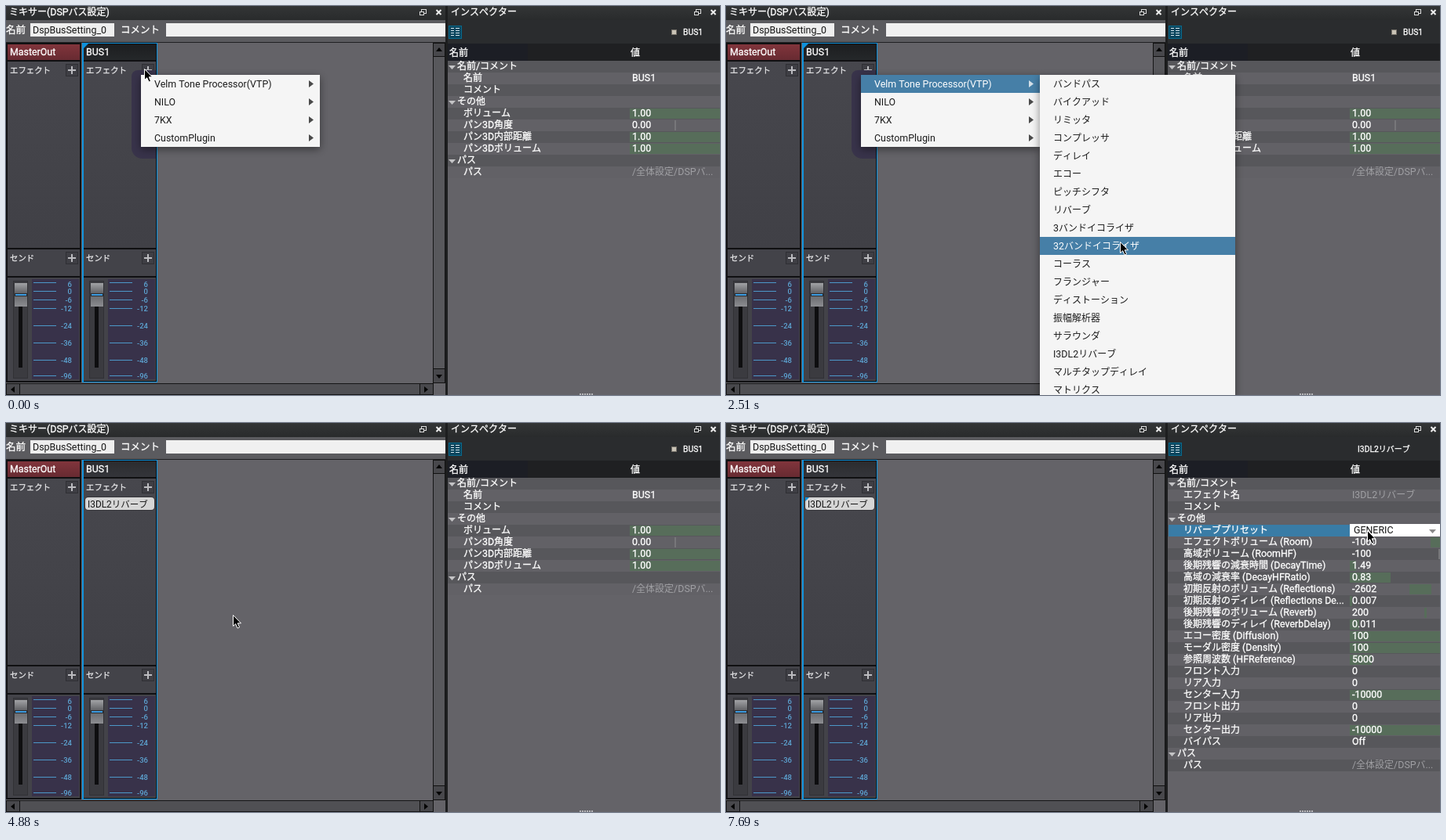
An HTML page with a canvas for the animation above (8000 ms loop, 910 by 497 pixels).

```html
<!DOCTYPE html>
<html lang="ja">
<head>
<meta charset="utf-8">
<title>ミキサー</title>
<style>
html, body { margin: 0; width: 100%; height: 100%; overflow: hidden; background: #646368; }
canvas { display: block; }
</style>
</head>
<body>
<canvas id="stage" width="910" height="497"></canvas>
<script>
const ctx = document.getElementById('stage').getContext('2d');
const LOOP = 8000, STEP = 148;
const BLUE = '#0f92dc', HOVER = '#467fa7';

const linear = u => u;
const brake = u => 1 - (1 - u) ** 3.9;
const swing = u => { const v = u ** .85; return v * v * (3 - 2 * v); };

// Pointer strokes: start time, steps, easing, end point, optional control point of the curve.
const START = [176, 80];
const MOVES = [
  [600, 3, brake, [234, 101]],
  [1480, 4, swing, [494, 193], [380, 40]],
  [2220, 3, linear, [502, 301]],
  [2660, 2, linear, [497, 370]],
  [3110, 3, linear, [486, 436]],
  [4880, 5, brake, [147, 101], [317, 277]],
  [6210, 8, swing, [811, 136], [500, 172]],
  [7400, 2, linear, [817, 137]],
];

const ROOT_MENU = ['Velm Tone Processor(VTP)', 'NILO', '7KX', 'CustomPlugin'];
const SUB_MENU = ['バンドパス', 'バイクアッド', 'リミッタ', 'コンプレッサ', 'ディレイ', 'エコー', 'ピッチシフタ',
  'リバーブ', '3バンドイコライザ', '32バンドイコライザ', 'コーラス', 'フランジャー', 'ディストーション',
  '振幅解析器', 'サラウンダ', 'I3DL2リバーブ', 'マルチタップディレイ', 'マトリクス'];

// Inspector rows: label, value, bar start and end inside the value cell. No value: group.
const FULL = [0, 115];
const PATH_ROWS = [['パス'], ['パス', '/全体設定/DSPバ...']];
const BUS_ROWS = [
  ['名前/コメント'], ['名前', 'BUS1'], ['コメント', ''], ['その他'],
  ['ボリューム', '1.00', ...FULL], ['パン3D角度', '0.00', 57, 59],
  ['パン3D内部距離', '1.00', ...FULL], ['パン3Dボリューム', '1.00', ...FULL],
  ...PATH_ROWS,
];
const REVERB_ROWS = [
  ['名前/コメント'], ['エフェクト名', 'I3DL2リバーブ'], ['コメント', ''], ['その他'],
  ['リバーブプリセット', 'GENERIC'],
  ['エフェクトボリューム (Room)', '-1000', 103, 115],
  ['高域ボリューム (RoomHF)', '-100', 113, 115],
  ['後期残響の減衰時間 (DecayTime)', '1.49', 0, 8],
  ['高域の減衰率 (DecayHFRatio)', '0.83', 0, 52],
  ['初期反射のボリューム (Reflections)', '-2602', 76, 104],
  ['初期反射のディレイ (Reflections De...', '0.007', 0, 3],
  ['後期残響のボリューム (Reverb)', '200', 95, 98],
  ['後期残響のディレイ (ReverbDelay)', '0.011', 0, 12],
  ['エコー密度 (Diffusion)', '100', ...FULL],
  ['モーダル密度 (Density)', '100', ...FULL],
  ['参照周波数 (HFReference)', '5000', 0, 28],
  ['フロント入力', '0'], ['リア入力', '0'], ['センター入力', '-10000', ...FULL],
  ['フロント出力', '0'], ['リア出力', '0'], ['センター出力', '-10000', ...FULL],
  ['バイパス', 'Off'],
  ...PATH_ROWS,
];

function box(x, y, w, h, fill, stroke) {
  ctx.fillStyle = fill;
  ctx.fillRect(x, y, w, h);
  if (stroke) {
    ctx.strokeStyle = stroke;
    ctx.lineWidth = 1;
    ctx.strokeRect(x + .5, y + .5, w - 1, h - 1);
  }
}

function rounded(x, y, w, h, radius, fill) {
  ctx.fillStyle = fill;
  ctx.beginPath();
  ctx.roundRect(x, y, w, h, radius);
  ctx.fill();
}

function poly(fill, ...points) {
  ctx.fillStyle = fill;
  ctx.beginPath();
  points.forEach(([x, y]) => ctx.lineTo(x, y));
  ctx.closePath();
  ctx.fill();
}

function shade(x, y, w, h, top, bottom) {
  const g = ctx.createLinearGradient(0, y, 0, y + h);
  g.addColorStop(0, top);
  g.addColorStop(1, bottom);
  box(x, y, w, h, g);
}

// Latin runs are slightly larger than Japanese ones; heft thickens light text on dark.
function text(str, x, cy, color = '#fff', size = 12, heft = .3) {
  ctx.fillStyle = ctx.strokeStyle = color;
  ctx.lineWidth = heft;
  ctx.textAlign = 'left';
  for (const run of str.match(/[ -~]+|[^ -~]+/g) || []) {
    ctx.font = run.charCodeAt(0) < 128
      ? `${size * 1.035}px Roboto, sans-serif`
      : `${size}px "Noto Sans CJK JP", "Noto Sans CJK", sans-serif`;
    ctx.fillText(run, x, cy + size * .37);
    if (heft) ctx.strokeText(run, x, cy + size * .37);
    x += ctx.measureText(run).width;
  }
}

const darkText = (str, x, cy, size = 12) => text(str, x, cy, '#161616', size, 0);

function titleBar(x, w, title) {
  shade(x, 0, w, 18, '#333536', '#292b2c');
  text(title, x + 4, 8);
  const right = x + w, cross = right - 8.5;
  ctx.strokeStyle = '#ddd';
  ctx.lineWidth = 1;
  ctx.strokeRect(right - 30.5, 4.5, 6, 5);
  box(right - 33, 7, 6, 5, '#2d2f30', '#ddd');
  ctx.lineWidth = 2;
  ctx.strokeStyle = '#eee';
  ctx.beginPath();
  ctx.moveTo(cross - 3, 5); ctx.lineTo(cross + 3, 11);
  ctx.moveTo(cross + 3, 5); ctx.lineTo(cross - 3, 11);
  ctx.stroke();
}

function plusButton(cx, cy) {
  box(cx - 8, cy - 8, 16, 16, '#3e3e44', '#2f2f34');
  box(cx - 5, cy - 1, 10, 2, '#bcbcc0');
  box(cx - 1, cy - 5, 2, 10, '#bcbcc0');
}

function fader(x) {
  box(x + 9, 351, 19, 125, '#3b3b40', '#313135');
  box(x + 16, 380, 5, 82, '#0e0e10');
  shade(x + 11, 354, 16, 14, '#a2a3a6', '#5c5d61');
  shade(x + 11, 371, 16, 13, '#6b6c70', '#8c8d91');
  box(x + 11, 367, 16, 4, '#2b2c30');
  box(x + 12, 368, 14, 2, '#3c9be0');
  box(x + 33, 349, 60, 128, '#38324a');
  const marks = { 355: '6', 364: '0', 375: '-6', 386: '-12', 408: '-24', 430: '-36', 452: '-48', 472: '-96' };
  for (const [y, label] of Object.entries(marks)) {
    box(x + 35, y - (label === '6' ? 2 : 0), 29, 1, '#4c98c9');
    ctx.font = '500 9.5px Roboto, sans-serif';
    ctx.textAlign = 'right';
    ctx.fillStyle = '#5da5d3';
    ctx.fillText(label, x + 84, +y + 3.5);
  }
}

function strip(x, name, headTop, headBottom) {
  box(x, 47, 96, 434, '#101012');
  shade(x + 2, 49, 92, 20, headTop, headBottom);
  text(name, x + 5, 59);
  shade(x + 2, 71, 92, 238, '#47474d', '#404046');
  box(x + 2, 311, 92, 34, '#434349');
  box(x + 2, 347, 92, 132, '#434349');
  text('エフェクト', x + 5, 82, '#e6e6e8', 10.4);
  text('センド', x + 5, 322, '#e6e6e8', 10.4);
  plusButton(x + 84, 82);
  plusButton(x + 84, 322);
  fader(x);
}

function scrollBars() {
  box(544, 47, 16, 435, '#58585c', '#151516');
  box(0, 482, 545, 15, '#505054', '#151516');
  for (const [x, y, w, h] of [[544, 47, 16, 18], [544, 463, 16, 19], [0, 482, 18, 15], [527, 482, 18, 15]])
    box(x, y, w, h, '#48484c', '#111');
  poly('#050505', [548, 58], [552, 53], [556, 58]);
  poly('#050505', [548, 471], [552, 476], [556, 471]);
  poly('#050505', [11, 486], [6, 490], [11, 494]);
  poly('#050505', [533, 486], [538, 490], [533, 494]);
}

function mixer(t) {
  titleBar(0, 560, 'ミキサー(DSPバス設定)');
  box(0, 18, 560, 29, '#5b5b5f');
  text('名前', 0, 30, '#fff', 12.5);
  box(31, 22, 107, 17, '#eee');
  darkText('DspBusSetting_0', 34, 30.5);
  text('コメント', 146, 30, '#fff', 12.5);
  box(204, 22, 356, 17, '#f0f0f0');
  box(0, 46, 560, 1, '#202022');

  strip(0, 'MasterOut', '#81353c', '#672a31');
  const busChosen = t < 4280;
  strip(97, 'BUS1', ...(busChosen ? ['#1c1e20', '#25282a'] : ['#2b2c2f', '#34353a']));
  ctx.strokeStyle = BLUE;
  ctx.lineWidth = 1;
  ctx.strokeRect(97.5, 47.5, 95, 433);
  box(98, 48, 1, 432, BLUE);
  if (busChosen) poly(BLUE, [98, 48], [105, 48], [98, 55]);
  if (t >= 4130) {
    rounded(100, 94, 90, 18, 5, '#35353a');
    rounded(101, 95, 88, 16, 4, '#d6d6d6');
    darkText('I3DL2リバーブ', 104, 103.5, 11.5);
    if (t >= 5770) poly(BLUE, [101, 95], [106, 95], [101, 100]);
  }
  scrollBars();
}

function inspectorRow([label, value, from, to], i, selected, editing) {
  const y = 70 + 15 * i, cy = y + 7;
  box(563, y, 347, 15, i % 2 ? '#626166' : '#57575b');
  if (value === undefined) {
    poly('#c4c4c6', [564, cy - 1], [573, cy - 1], [568.5, cy + 4]);
    text(label, 575, cy);
    return;
  }
  if (to) box(795 + from, y + 1, to - from, 13, to - from === 2 ? '#77777a' : '#576d5a');
  if (selected) box(564, y, 346, 15, '#397ca6');
  text(label, 583, cy);
  if (editing) {
    box(795, y - 1, 115, 16, '#fff');
    poly('#8a8a8a', [896, cy - 1], [905, cy - 1], [900.5, cy + 4]);
    darkText(value, 800, cy);
  } else if (value[0] === '/' || label === 'エフェクト名') text(value, 798, cy, '#a0a0a4', 12, 0);
  else text(value, 798, cy);
}

function inspector(t) {
  const reverb = t >= 5770;
  box(560, 0, 3, 497, '#1d1e1f');
  titleBar(563, 347, 'インスペクター');
  box(563, 18, 347, 30, '#2a2c2e');
  box(564, 25, 17, 17, '#0b455d', '#07698d');
  for (let i = 0; i < 4; i++) {
    box(567, 28 + 3 * i, 4, 1, '#d5e6ee');
    box(573, 28 + 3 * i, 5, 1, '#d5e6ee');
  }
  if (reverb) text('I3DL2リバーブ', 805, 33, '#fff', 10);
  else {
    box(848, 30, 7, 7, '#c9c3b6', '#77736b');
    text('BUS1', 863, 33, '#fff', 10);
  }
  box(563, 48, 347, 22, '#1f2022');
  box(563, 48, 102, 22, '#1c1e25');
  text('名前', 565, 59.5);
  text('値', 796, 59.5);
  (reverb ? REVERB_ROWS : BUS_ROWS).forEach((row, i) =>
    inspectorRow(row, i, i === 4 && t >= 7548, i === 4 && t >= 7690));
  for (let i = 0; i < 6; i++) box(731 + 3 * i, 495, 2, 2, '#b5b5b8');
}

function menu(x, w, items, hovered, hasArrows) {
  ctx.save();
  ctx.shadowColor = 'rgba(0,0,0,.45)';
  ctx.shadowBlur = 10;
  ctx.shadowOffsetY = 3;
  box(x, 88, w, 23 * items.length, '#f5f5f5');
  ctx.restore();
  items.forEach((item, i) => {
    const y = 88 + 23 * i, on = i === hovered;
    if (on) box(x, y, w, 23, HOVER);
    text(item, x + 17, y + 11.5, on ? '#fff' : '#1c1c1c', 12, 0);
    if (hasArrows) poly(on ? '#d3e0e9' : '#4a4a4a', [x + 214, y + 7], [x + 220, y + 11.5], [x + 214, y + 16]);
  });
}

function menus(t, [px, py]) {
  if (t >= 4130) return;
  ctx.save();
  if (t >= 3990) ctx.globalAlpha = .5;
  rounded(160, 82, 31, 113, [8, 0, 0, 14], '#38334a');
  menu(172, 228, ROOT_MENU, t >= 600 ? 0 : -1, true);
  if (t >= 740) menu(400, 249, SUB_MENU, px >= 400 ? Math.floor((py - 88) / 23) : -1, false);
  ctx.restore();
}

function pointerAt(t) {
  let from = START, at = START;
  for (const [start, steps, ease, to, bend] of MOVES) {
    if (t < start) break;
    // A little slack keeps the last steps from falling late.
    const step = Math.min(steps, 1 + Math.floor((t - start + 8) / STEP));
    const s = ease(step / steps), r = 1 - s;
    at = from.map((a, k) => {
      const mid = bend ? bend[k] : (a + to[k]) / 2;
      return Math.round(r * r * a + 2 * r * s * mid + s * s * to[k]);
    });
    from = to;
  }
  return at;
}

function pointer([x, y]) {
  ctx.save();
  ctx.translate(x + .5, y + .5);
  poly('#000', [0, 0], [0, 14], [3.2, 11.2], [5.6, 16.6], [8, 15.5], [5.7, 10.3], [10, 10.3]);
  ctx.strokeStyle = '#fff';
  ctx.lineWidth = 1;
  ctx.stroke();
  ctx.restore();
}

function draw() {
  const t = performance.now() % LOOP;
  const at = pointerAt(t);
  box(0, 0, 910, 497, '#646368');
  mixer(t);
  inspector(t);
  menus(t, at);
  pointer(at);
  requestAnimationFrame(draw);
}
draw();
</script>
</body>
</html>
```
